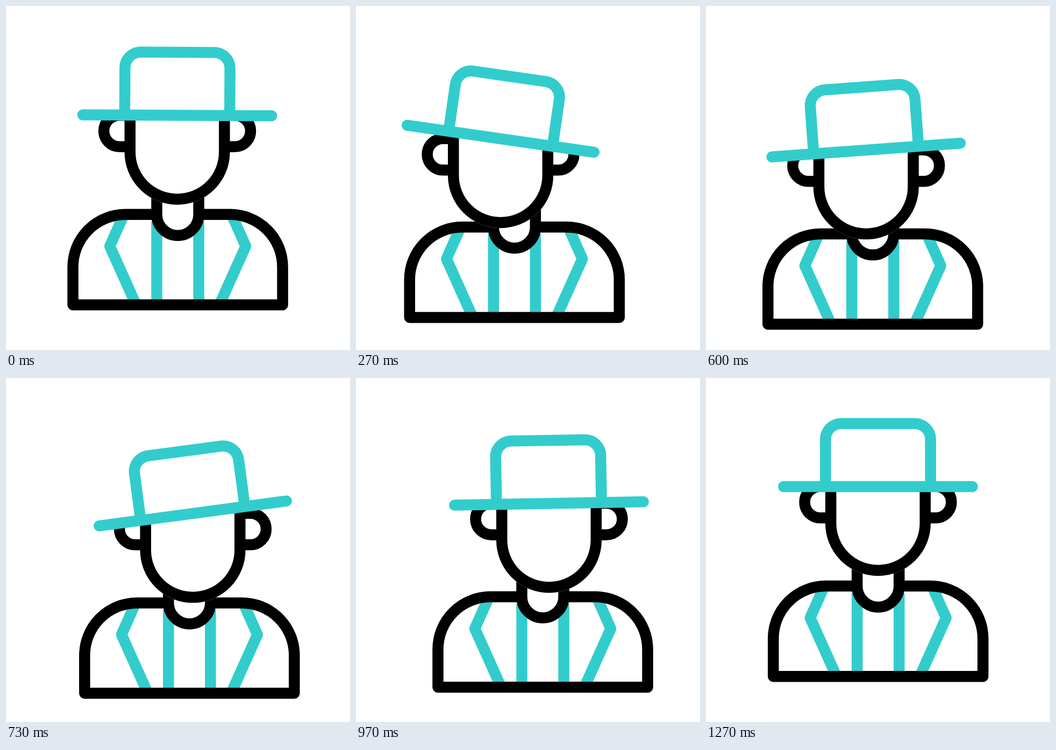
These frames come from a looping animation (640 by 640 pixels, 1670 ms). An HTML page:

```html
<!DOCTYPE html>
<html lang="en">
<head>
<meta charset="utf-8">
<title>Man in a hat</title>
<style>
  html, body { margin: 0; width: 100%; height: 100%; overflow: hidden; background: #fff; }
  svg { display: block; width: 100vw; height: 100vh; }
  path { fill: none; stroke: #000; stroke-width: 20.5; stroke-linejoin: round; }
  .teal { stroke: #3cc; }
  .halo { stroke: #fff; }
  .fill { fill: #fff; }
</style>
</head>
<body>
<svg viewBox="0 0 640 640">
  <g id="body">
    <path class="teal" d="M281.2 400V550M359.3 400V550"/>
    <path class="teal" d="M218.9 390L193.8 446.2L241.8 553M421.6 390L446.7 446.2L398.7 553"/>
    <path d="M281.2 387.1H222.8A97.6 97.6 0 0 0 125.2 484.7V555.2H515.3V484.7A97.6 97.6 0 0 0 417.7 387.1H359.3"/>
    <path d="M281.2 340V387.2A39.05 39.05 0 0 0 359.3 387.2V340"/>
  </g>
  <g id="head">
    <path class="halo fill" d="M232.2 185V270.2A87.8 87.8 0 0 0 407.8 270.2V185"/>
    <path d="M232 260.3H212.8A29.3 29.3 0 0 1 212.8 201.7H232M408 260.3H427.2A29.3 29.3 0 0 0 427.2 201.7H408"/>
    <path d="M232.2 185V270.2A87.8 87.8 0 0 0 407.8 270.2V185"/>
  </g>
  <g id="hat">
    <rect x="144" y="95" width="352" height="107" fill="#fff"/>
    <path class="teal fill" d="M222.3 202V114A29.3 29.3 0 0 1 251.6 84.7H388.4A29.3 29.3 0 0 1 417.7 114V202"/>
    <path class="teal" stroke-linecap="round" d="M144.3 202H495.7"/>
  </g>
</svg>
<script>
const LOOP = 1670, STEP = 100 / 3, LAST = 38;
const LEG = 13; // steps per leg: rest to left, left to right, right to rest

const bodyPath = [
  [0, 0], [-14, 14.4], [-23, 15.5],
  [-31.2, 35], [-22.4, 35.2], [6.1, 43],
  [31.5, 25.5], [27.9, 17.7], [11.2, 8.1], [0, 0]
];
const headPath = [
  [0, 0], [-28.8, 28.7], [-47.2, 32.1],
  [-61.2, 61.5], [-37.1, 70.2], [-0.7, 70.3],
  [45.8, 39], [38.8, 29.1], [16.9, 12.6], [0, 0]
];
const tilts = [[0, 0], [9, 8.2], [23.3, -7.6], [32, 0]];

const ease = u => u * u * (3 - 2 * u);

// Point on a chain of cubic curves, each leg eased at both ends
function along(path, n) {
  const leg = Math.min(2, Math.floor(n / LEG));
  const [a, b, c, d] = path.slice(leg * 3, leg * 3 + 4);
  const e = ease(n / LEG - leg), r = 1 - e;
  return [0, 1].map(i =>
    r * r * r * a[i] + 3 * r * r * e * b[i] + 3 * r * e * e * c[i] + e * e * e * d[i]);
}

function tiltAt(n) {
  const i = tilts.findIndex(k => k[0] > n);
  if (i < 0) return 0;
  const [n0, a] = tilts[i - 1], [n1, b] = tilts[i];
  return a + (b - a) * ease((n - n0) / (n1 - n0));
}

const [body, head, hat] = ["body", "head", "hat"].map(id => document.getElementById(id));
const place = (el, move, turn = "") => el.setAttribute("transform", `translate(${move})${turn}`);

function draw() {
  const t = performance.now() % LOOP;
  const n = Math.min(LAST, Math.floor((t + 5) / STEP)) + 1;
  const shift = along(headPath, n);
  place(body, along(bodyPath, n));
  place(head, shift);
  place(hat, shift, ` rotate(${tiltAt(n)} 320 202)`);
  requestAnimationFrame(draw);
}
draw();
</script>
</body>
</html>
```
